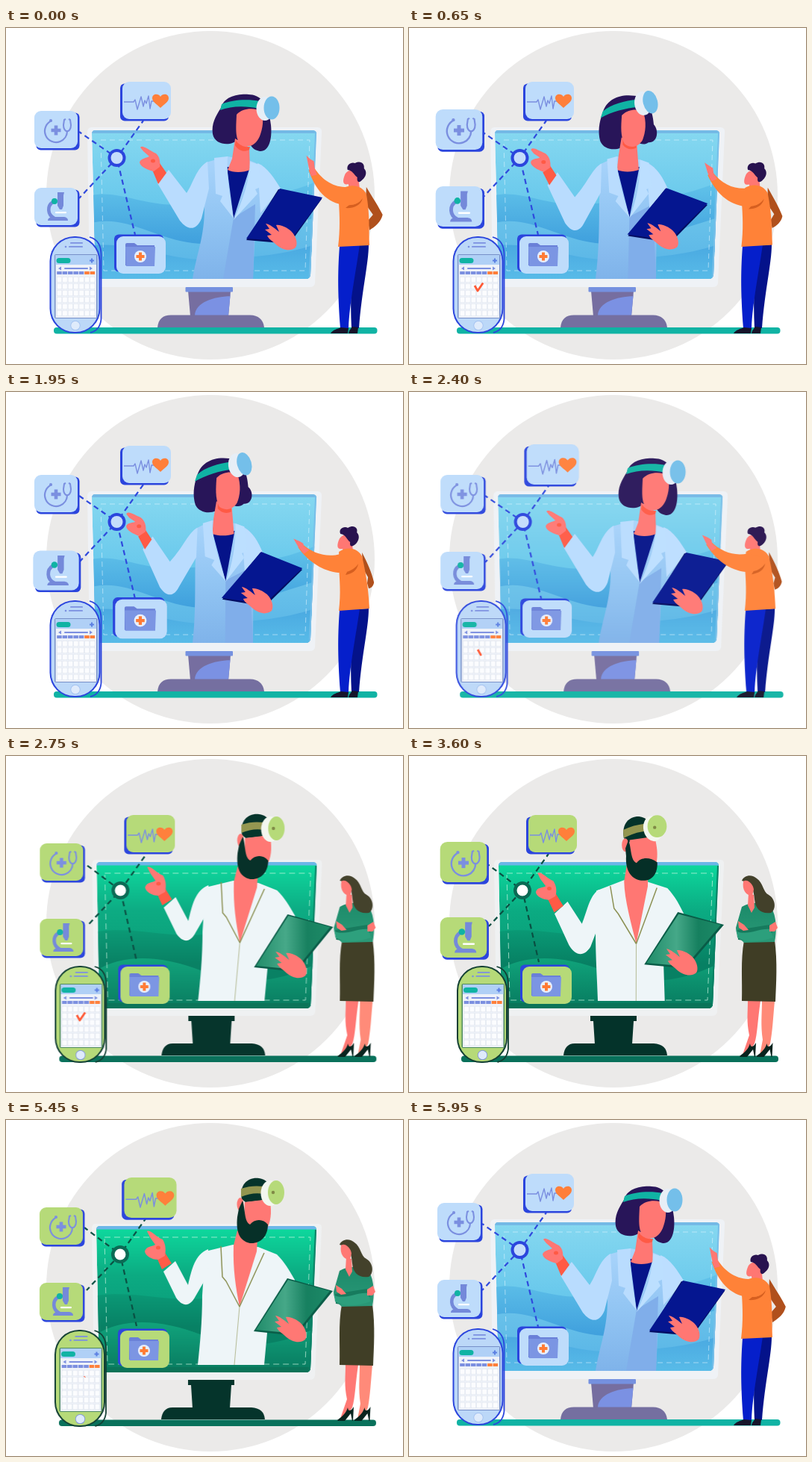
An HTML page with a canvas for the animation above (6 s loop, 532 px wide and 450 px high).

```html
<!DOCTYPE html>
<html lang="en">
<head>
<meta charset="utf-8">
<title>Online consultation</title>
<style>
html, body { margin: 0; width: 100%; height: 100%; overflow: hidden; background: #fff; }
canvas { display: block; width: 532px; height: 450px; }
</style>
</head>
<body>
<canvas id="stage" width="532" height="450"></canvas>
<script>
const W = 532, H = 450, LOOP = 6000;
const view = document.getElementById('stage').getContext('2d');
const layer = document.createElement('canvas');
layer.width = W;
layer.height = H;
const c = layer.getContext('2d');

const SKIN = '#ff7773', DEEP = '#ff5a45', ICON = '#7b8fe0', BLUE = '#2b45dd', ORANGE = '#ff7f3a', TEAL = '#10b3a4';
const NUM = /-?[\d.]+/g;

const clamp = v => Math.max(0, Math.min(1, v));
const ramp = (t, a, b) => clamp((t - a) / (b - a));
const ease = (t, a, b) => { const u = ramp(t, a, b); return u * u * (3 - 2 * u); };
const lerp = (a, b, k) => a + (b - a) * k;
const bump = (t, mid, half) => {
  const u = Math.abs(t - mid) / half;
  return u < 1 ? (1 + Math.cos(Math.PI * u)) / 2 : 0;
};

// Blends two paths that share the same commands.
function mix(a, b, k) {
  const to = b.match(NUM);
  let i = 0;
  return a.replace(NUM, v => lerp(+v, +to[i++], k).toFixed(2));
}
function fill(color, d) {
  c.fillStyle = color;
  c.fill(new Path2D(d));
}
function line(color, width, d) {
  c.strokeStyle = color;
  c.lineWidth = width;
  c.stroke(new Path2D(d));
}
function box(color, x, y, w, h, r = 0) {
  c.fillStyle = color;
  c.beginPath();
  c.roundRect(x, y, w, h, r);
  c.fill();
}
function oval(color, x, y, rx, ry = rx, turn = 0) {
  c.fillStyle = color;
  c.beginPath();
  c.ellipse(x, y, rx, ry, turn, 0, Math.PI * 2);
  c.fill();
}
function fade(y0, y1, ...colors) {
  const g = c.createLinearGradient(0, y0, 0, y1);
  colors.forEach((v, i) => g.addColorStop(i / (colors.length - 1), v));
  return g;
}
function at(x, y, draw) {
  c.save();
  c.translate(x, y);
  draw();
  c.restore();
}
function cross(color, x, y, size, w) {
  box(color, x - size / 2, y - w / 2, size, w);
  box(color, x - w / 2, y - size / 2, w, size);
}

// ---- icon cards ----

function heartIcon() {
  line(ICON, 1.4, 'M158 99H171L173 96L176 109L181 92L184 105L186 97L188 101L191 91L193 108L195 98H198');
  fill(ORANGE, 'M207 107C202 102 196 99 196 94C196 88 204 87 207 92C210 87 218 88 218 94C218 99 212 102 207 107Z');
}
function scopeIcon() {
  c.strokeStyle = ICON;
  c.lineWidth = 2.2;
  c.beginPath();
  c.arc(67, 138, 15, -1.95, 0, true);
  c.stroke();
  oval(ICON, 60, 124, 2);
  line(ICON, 2, 'M80 122L78 123L77 130C77 141 87 141 87 130L86 123L84 122');
  cross(ICON, 67, 137, 13, 4.6);
}
function microIcon() {
  line('#7489da', 4.5, 'M63 233C55 238 55 250 65 255');
  fill('#7489da', 'M56 258C56 254 60 253 64 253H76C81 253 83 255 83 258Z');
  fill('#7489da', 'M69 220H78L77 224V238L75 243H72L69 238V224Z');
  box('#fff', 66, 246, 15, 2.2, 1);
  oval(TEAL, 65, 232, 4);
}
function folderIcon() {
  fill('#6a80d8', 'M160 318V290Q160 288 162 288H172L176 291H199V318Z');
  fill('#7b95e3', 'M160 293H200L199 319H161Z');
  oval('#e8f0ff', 180, 306, 8);
  cross('#ff7b35', 180, 306, 11, 4);
}
// x, y, width, height, shadow shift, icon, shift in the second scene
const CARDS = [
  [156, 72, 65, 50, -3, 2.5, heartIcon, 4, 7],
  [38, 111, 58, 50, 2.5, 2.5, scopeIcon, 6, 6],
  [38, 214, 58, 50, 2.5, 2.5, microIcon, 6, 4],
  [148, 279, 66, 50, -3, -2.5, folderIcon, 4, 3]
];
function cards(t, green) {
  const grow = [
    bump(t, 2900, 400) * 0.08,
    bump(t, 1100, 400) * 0.08,
    bump(t, 1120, 420) * 0.08 + bump(t, 2480, 280) * 0.07,
    bump(t, 2280, 300) * 0.08
  ];
  CARDS.forEach(([x, y, w, h, sx, sy, icon, dx, dy], i) => at(green ? dx : 0, green ? dy : 0, () => {
    const mx = x + w / 2, my = y + h / 2;
    c.translate(mx, my);
    c.scale(1 + grow[i], 1 + grow[i]);
    c.translate(-mx, -my);
    box(BLUE, x + sx, y + sy, w, h, 6);
    box(green ? '#b6da78' : '#bedcfb', x, y, w, h, 9);
    icon();
  }));
}

function links(t, green) {
  const [nx, ny] = green ? [152, 180] : [148.5, 174];
  const ends = green
    ? [[104, 144], [107, 228], [187, 131], [174, 276]]
    : [[98, 139], [98, 228], [184, 124], [173, 277]];
  c.save();
  c.setLineDash([7, 5]);
  c.lineDashOffset = -t * 0.02;
  for (const [x, y] of ends) line(green ? '#0a4f42' : '#2f49dd', 2.2, `M${x} ${y}L${nx} ${ny}`);
  c.restore();
  oval(green ? '#0a6a54' : BLUE, nx, ny, 12);
  oval(green ? '#fff' : '#c4dcfb', nx, ny, green ? 7.5 : 8);
}

// ---- phone ----

function phone(t, green) {
  const edge = green ? '#123f33' : BLUE;
  at(green ? 5.5 : 0, green ? 2 : 0, () => {
    line(edge, 1.8, 'M112 280Q127.5 284 127.5 304V390Q126 405 113 408');
    box(edge, 58.5, 279, 68, 130, 33);
    box(green ? '#b6da78' : '#bcd8f8', 60.5, 281, 64, 126, 31);
    box(ICON, 86, 287, 17, 1.8, 1);
    box(ICON, 84, 292, 19, 1.8, 1);
    oval(ICON, 80, 293, 1.3);
    box(green ? '#4f8a60' : '#7790c8', 65, 303, 57.5, 86, 2);
    box('#eef2f9', 66.5, 304, 54.5, 84);
    box('#b0d0f6', 66.5, 304, 54.5, 13);
    box(TEAL, 67.5, 308, 19, 7, 3.5);
    cross('#5b7fe2', 115, 311.5, 6, 2);
    fill(ICON, 'M70 322L74 319.5V324.5ZM116 322L112 319.5V324.5Z');
    box(ICON, 78, 321, 32, 2, 1);
    for (let x = 0; x < 7; x++) {
      const left = 68.2 + x * 7.4;
      box(x > 4 ? ORANGE : ICON, left, 326, 6.5, 4);
      for (let y = 0; y < 6; y++) {
        box('#dce2ec', left, 333 + y * 9, 6.7, 8, 1);
        box('#fbfcfe', left + 0.4, 333.4 + y * 9, 5.9, 7.2, 1);
      }
    }
    oval(green ? '#7b8fe0' : '#9fbff0', 93, 398.5, 6.6);
    oval('#dfebfb', 93, 398.5, 5.8);
    tick((t + 4000) % 2000);
  });
}
function tick(t) {
  const len = 20.8, head = ramp(t, 250, 600) * len, tail = ease(t, 1180, 1490) * len;
  if (head - tail < 0.2) return;
  c.save();
  c.setLineDash([head - tail, 60]);
  c.lineDashOffset = -tail;
  line('#ff5a36', 2.8, 'M88 345L92 352L99.5 341');
  c.restore();
}

// ---- monitor ----

function monitorBlue() {
  fill('#eff2f6', 'M114 133H418Q424 134 423 140L414 342Q413 347 407 347H118Q113 346 112 340L109 139Q109 134 114 133Z');
  const screen = 'M119 137H412Q417 138 416 143L408 331Q407 336 402 336H125Q120 336 120 331L115 142Q115 137 119 137Z';
  c.save();
  c.clip(new Path2D(screen));
  fill(fade(137, 336, '#86d8f0', '#68c8ec', '#62bce8'), screen);
  fill(fade(205, 290, '#62c4ea', '#3f9fdd'), 'M115 224C150 216 190 241 240 236S350 235 420 204V300H115Z');
  fill(fade(255, 336, '#69c2ea', '#57b3e6'), 'M115 261C160 250 200 282 250 288S360 270 420 252V340H115Z');
  fill(fade(290, 336, '#4aa9e1', '#58bbe8'), 'M115 292C160 284 220 312 270 310S370 306 420 288V340H115Z');
  box('#74b9e6', 110, 137, 310, 4);
  line('#78bfe9', 4, 'M416 140L408 336');
  c.restore();
  c.save();
  c.setLineDash([7, 5]);
  line('rgba(230,246,255,.55)', 1, 'M127 150H407L401 325H131Z');
  c.restore();
  fill('#766ea0', 'M244 352H301L298 386H247Z');
  fill('#7b91e3', 'M301 354L298 385H253C254 367 278 360 301 359Z');
  box('#7591e0', 240.5, 347, 63.5, 6.5, 1);
  fill('#756fa0', 'M203 401C204 390 210 384.5 221 384.5H327Q344 385 346 401Z');
  box(TEAL, 64, 401, 433.5, 8.5, 4);
}
function monitorGreen() {
  fill('#eff1f2', 'M118 139H418Q423 140 422 146L413 343Q412 348 406 348H123Q118 347 117 341L114 145Q114 140 118 139Z');
  const screen = 'M125 142H411Q416 143 415 149L407 333Q406 338 401 338H129Q124 338 124 333L120 147Q120 142 125 142Z';
  c.save();
  c.clip(new Path2D(screen));
  fill(fade(146, 330, '#0dd89d', '#0bab82', '#0a9c78', '#078063'), screen);
  fill(fade(226, 278, '#0a9d78', '#078063'), 'M115 236C170 226 220 246 270 238S360 236 420 214V340H115Z');
  fill(fade(268, 335, '#10a57c', '#087c60'), 'M115 290C150 266 200 264 262 288S370 300 420 276V340H115Z');
  box('#0a7358', 115, 331, 310, 8);
  box('#6bb6e8', 115, 142, 310, 4.5);
  line('#098064', 4, 'M415 147L407 337');
  c.restore();
  c.save();
  c.setLineDash([8, 5]);
  line('rgba(205,245,225,.7)', 1, 'M131 157H407L400 327H135Z');
  c.restore();
  fill('#04332a', 'M243 348H305V355H301L299 386H249L247 355H243ZM207 401C208 391 213 385 222 385H328Q345 386 346 401Z');
  box('#08705a', 70, 401.5, 425, 8.5, 4);
}

function palm(k, from, to, dy) {
  at(lerp(from, to, k), dy * k, () =>
    fill(SKIN, 'M348 262C354 263 361 269 366 273L362 264C368 263 376 267 382 272C390 280 391 290 388 294C381 300 370 297 363 291C358 286 352 283 350 278L356 277L347 270L353 269Z'));
}
// The head dips a little halfway through its swing.
const dip = k => 5.5 * Math.sin(Math.PI * k);

// ---- first scene ----

function doctorBlue(k) {
  const m = (a, b) => mix(a, b, k);
  const hair = m(
    'M288 107C292 92 310 88 325 89C340 89 352 100 355 130C357 150 352 166 340 165C330 163 328 158 325 150L310 150C303 158 280 158 277 142C275 128 281 118 288 107Z',
    'M252 112C257 92 275 84 296 87C312 88 320 105 321 125C330 130 328 147 316 146C312 152 305 150 300 150L285 152C280 162 258 164 251 150C247 138 248 124 252 112Z');
  at(0, dip(k), () => fill('#281559', hair));
  fill(fade(172, 336, '#a9d4fb', '#92c5f3', '#7fb3ea'), m(
    'M268 180L297 172L328 178C345 184 355 195 367 214L345 260L334 270L331 336L250 336C256 300 266 280 266 240Z',
    'M253 183L274 172L306 176C325 182 333 195 341 214L325 262L331 275L331 336L250 336C253 310 252 280 252 240Z'));
  fill('#80aeea', m('M305 254L334 236L331 336L291 336Z', 'M293 252L325 236L331 336L294 336Z'));
  fill('#bcdeff', m('M337 181C350 186 360 202 368 215L341 248Z', 'M313 180C328 186 336 202 341 215L318 248Z'));
  fill('#051389', m('M296 186L327 186L305 255Z', 'M274 186L304 186L293 253Z'));
  fill(SKIN, m('M307 148L303 175L297 190C304 194 318 194 327 190L326 160Z', 'M279 146L275 170L274 190C282 193 294 193 303 190L300 155Z'));
  fill(DEEP, m('M308 151C314 158 320 160 327 159L326 163C319 167 311 164 307 157Z', 'M281 149C286 154 291 157 299 155L299 160C293 163 286 162 281 156Z'));
  fill('#b9dcfe', m('M279 174L297 172C295 200 302 235 305 255L287 232L290 225L281 222Z', 'M262 176L274 172C273 200 288 235 293 253L274 232L278 225L265 220Z'));
  fill('#bcdfff', m('M327 179L339 183L341 213L334 216L337 222L305 257C318 230 326 205 327 179Z', 'M305 176L317 180L321 213L314 216L317 222L293 254C302 230 306 205 305 176Z'));
  fill('#b9dcfe', m(
    'M270 179C255 187 250 210 242 221L218 190L203 208L233 258C245 273 256 270 262 255L272 215Z',
    'M255 182C243 188 238 205 217 228L194 194L181 211L203 262C212 276 222 274 228 262L253 222Z'));
  fill(DEEP, m('M196 190L204 209L215 194L206 181Z', 'M175 194L184 211L193 198L184 184Z'));
  fill(SKIN, m(
    'M180 160C183 156 190 163 201 168C206 172 207 180 206 186L198 192C190 190 180 186 179 180C180 175 188 174 192 172L184 165Z',
    'M159 164C161 159 168 164 178 168C184 172 186 180 185 187L176 193C168 190 159 185 159 180C160 175 166 176 171 174L163 169Z'));
  oval(DEEP, lerp(197, 176, k), lerp(178, 180, k), 3, 2.5);
  at(0, dip(k), () => {
    fill(SKIN, m(
      'M309 116C318 106 335 107 342 112C346 122 344 135 340 145C334 158 325 161 316 156C307 151 308 136 309 116Z',
      'M279 113C287 105 298 104 306 107C312 122 310 138 306 147C300 157 288 157 282 151C277 140 278 126 279 113Z'));
    fill(TEAL, m('M289 102C303 96 324 95 340 98L339 108C322 104 302 104 287 110Z', 'M252 110C263 99 280 94 297 91L299 101C282 104 264 110 249 119Z'));
    oval('#e6eef6', lerp(347, 305, k), lerp(108, 95, k), 11.5, 16, -.15 * k);
    oval('#74bfea', lerp(356, 315, k), lerp(107, 93, k), lerp(10.5, 9.5, k), 15.5, -.3 * k);
  });
  fill('#030d62', m('M365 216L423 229L380 289L322 284Z', 'M338 215L394 239L343 287L286 277Z'));
  fill('#051690', m('M367 215L424 227L380 286L322 282Z', 'M339 214L394 237L342 284L285 275Z'));
  palm(k, 0, -36, -1);
}
function man(k) {
  const m = (a, b) => mix(a, b, k);
  fill('#b0501c', m('M483 213C492 228 500 240 505 250C503 260 494 267 487 271L485 258L492 250L482 236Z', 'M477 215C484 228 490 242 493 255C492 260 490 262 486 263L484 256L485 248L478 236Z'));
  fill('#04128a', 'M465 291L486 290C486 315 477 350 473 402L463 402C461 360 463 330 465 291Z');
  fill('#051fcb', 'M447 292L474 290C470 320 460 370 459 402L448 402C444 350 445 320 447 292Z');
  fill('#16142a', 'M435 409C438 404 444 403 449 401L459 402L458 409ZM459 409C460 404 463 402 464 400L472 401L471 409Z');
  fill(SKIN, m('M455 195C460 188 470 190 472 196L474 214L460 216L459 209C452 211 450 206 455 195Z', 'M447 196C452 189 460 191 463 196L465 214L452 216L451 210C444 212 442 206 447 196Z'));
  fill('#28124f', m(
    'M458 190C456 183 463 179 468 181C476 177 481 182 480 188C485 193 482 200 478 203C474 208 470 207 471 200C466 196 465 191 458 190Z',
    'M448 190C445 183 453 179 458 182C466 177 472 182 470 188C475 193 472 200 469 203C464 208 460 208 461 201C456 197 455 191 448 190Z'));
  fill('#ff8238', m('M453 214C465 208 478 212 483 222C488 250 486 270 487 291L445 293C448 270 447 250 446 234Z', 'M446 214C458 206 471 209 477 220C484 250 486 270 487 290L446 293C449 270 447 250 446 234Z'));
  fill('#d65f20', m('M478 228C476 238 464 242 455 241L460 237C468 237 474 234 478 228Z', 'M472 230C470 240 464 243 455 245L458 239C464 238 469 235 472 230Z'));
  fill('#ff8238', m('M477 221C479 233 468 238 455 237C430 235 414 215 406 190L413 186C425 205 440 213 458 213Z', 'M470 222C472 236 462 242 445 242C425 240 405 228 391 208L397 204C412 217 430 222 448 217Z'));
  fill(SKIN, m('M403 170L408 175L413 178L414 187L417 196L409 198L406 186Z', 'M385 197L393 200L398 203L399 207L406 212L399 217L391 207Z'));
}
function sceneBlue(t) {
  monitorBlue();
  links(t, false);
  cards(t, false);
  phone(t - 450, false);
  doctorBlue(ease(t, 690, 1270) * (1 - ease(t, 2300, 2800)));
  man((1 - Math.cos((t - 250) / 4000 * Math.PI * 2)) / 2);
}

// ---- second scene ----

function headGreen(k) {
  const m = (a, b) => mix(a, b, k);
  fill('#04332a', m('M315 106C311 85 325 76 338 78C352 80 356 92 354 104L340 108L320 110Z', 'M279 106C275 85 288 76 300 77C312 79 318 90 318 104L306 110L285 112Z'));
  fill(SKIN, m('M319 110L352 106C355 118 355 132 350 143C340 148 325 145 318 137Z', 'M288 108L321 103C325 115 327 128 325 140C312 144 296 142 288 134Z'));
  oval(SKIN, lerp(313, 282, k), lerp(113, 116, k), 4.5, 9);
  fill('#052f27', m(
    'M316 108C320 120 318 136 326 140C332 132 344 132 350 140C350 156 340 166 326 165C312 162 307 150 309 130L311 119Z',
    'M287 108C291 122 290 136 298 139C304 131 316 131 327 138C328 154 320 164 306 162C292 160 284 148 285 130L283 120Z'));
  fill('#93964f', m('M314 92C325 88 335 88 345 89L344 99C334 97 324 99 314 103Z', 'M278 96C287 91 296 88 306 86L308 96C297 98 288 102 279 107Z'));
  oval('#f3f7ef', lerp(353, 318, k), lerp(98, 92, k), 12.5, 17, -.3 * k);
  oval('#b6da78', lerp(361, 323, k), lerp(97, 88, k), lerp(11, 13.5, k), lerp(16, 14.5, k));
  oval('#7f8a45', lerp(357, 320, k), lerp(97, 90, k), 2.2);
}
function doctorGreen(k) {
  const m = (a, b) => mix(a, b, k);
  fill('#eef5f8', m(
    'M266 176L303 167L337 170L362 180C372 190 378 200 386 214L370 260L350 275L345 328L256 328C259 300 262 270 262 235Z',
    'M246 182L283 166L314 168L341 176C352 188 358 200 364 214L352 260L338 275L342 328L252 328C250 300 246 270 246 235Z'));
  fill(SKIN, m('M309 148L304 168C303 200 307 225 312 250L335 176L336 160Z', 'M286 146L283 168C284 190 295 225 302 252L315 174L315 156Z'));
  line('#8c9154', 1.5, m('M287 169L289 210L294 216L312 250L345 178', 'M264 176L270 202L276 210L302 252L328 176'));
  line('#b5bb95', 1, m('M312 250L305 328', 'M302 252L304 328'));
  fill('#eef5f8', m(
    'M270 173C252 180 248 200 243 221L226 189L210 203L227 238C236 251 246 250 253 236L271 205Z',
    'M249 181C238 190 236 210 228 226L208 197L190 214L210 258C220 276 232 274 240 262L254 220Z'));
  at(0, dip(k) * .5, () => {
    fill(DEEP, m('M200 182L208 200L221 192L211 176Z', 'M180 189L190 210L202 201L191 183Z'));
    fill(SKIN, m(
      'M188 149C193 146 200 157 209 160C214 168 213 176 212 182L203 187C194 187 186 182 185 176C187 169 194 170 199 167L192 157Z',
      'M167 157C171 153 179 163 188 167C193 174 193 182 191 187L182 192C174 191 166 188 165 182C166 175 173 177 178 174L171 165Z'));
    oval(DEEP, lerp(203, 183, k), lerp(171, 177, k), 3, 2.5);
  });
  at(0, dip(k), () => headGreen(k));
  const shift = lerp(0, -20, k);
  const g = c.createLinearGradient(332 + shift, 0, 436 + shift, 0);
  [['#1f8b68', 0], ['#45a888', .4], ['#16805f', .68], ['#1d8a67', 1]].forEach(([v, p]) => g.addColorStop(p, v));
  fill('#095c47', m('M376 212L437 229L388 289L331 283Z', 'M355 208L417 225L366 283L310 278Z'));
  fill(g, m('M377 214L433 229L387 286L334 281Z', 'M356 211L413 225L365 280L313 276Z'));
  palm(k, 12, -8, -5);
}
function woman(k) {
  const m = (a, b) => mix(a, b, k);
  fill('#ff8a78', 'M473 328H490C488 350 487 370 484 385L477 400L470 401L474 380C471 360 473 345 473 328Z');
  fill(SKIN, 'M454 328H471C467 355 467 372 463 385L455 398L447 400L456 374C452 355 454 345 454 328Z');
  for (const x of [0, 22.5]) at(x, 0, () => fill('#07231d', 'M443 402C450 397 455 392 457 385C458 392 462 389 465 384L464 403H463L461 393L453 403H444Z'));
  fill('#3f3d25', 'M449 247H490C494 275 492 305 491 329L446 328C447 300 444 275 449 247Z');
  fill(fade(195, 252, '#1b8a69', '#2a9977'), m(
    'M446 202C457 195 475 195 485 202C493 215 493 235 490 249L449 250C446 247 438 242 438 230Z',
    'M451 201C464 194 480 195 490 203C497 215 494 235 491 249L450 250C446 247 442 240 443 228Z'));
  fill(SKIN, m('M455 184L454 200L459 210L463 203L462 186Z', 'M467 182L465 199L468 209L475 202L475 184Z'));
  fill('#42402a', m(
    'M446 167C449 159 460 158 466 164C475 170 474 182 482 186C492 192 492 206 485 210C472 212 464 205 463 192C462 180 460 170 446 167Z',
    'M460 165C462 156 474 155 480 160C488 168 486 180 492 188C498 198 496 213 488 215C474 214 468 206 472 194C476 180 474 170 460 165Z'));
  fill(SKIN, m('M448 168C453 164 461 171 462 179L460 187C452 187 446 180 448 168Z', 'M463 166C467 161 476 168 476 176L474 183C467 183 461 178 463 166Z'));
  fill('#167a5d', m('M440 233L483 226L487 236C472 246 452 248 441 246Z', 'M445 233L487 229L491 238C476 247 456 248 445 246Z'));
  fill('#2c9f7c', m('M439 235C455 241 470 230 484 232L488 243C470 250 450 250 440 243Z', 'M444 234C459 240 474 230 488 233L491 244C474 250 454 250 445 244Z'));
  fill(SKIN, m('M441 221L449 226L455 233L448 234L442 230ZM483 227L491 222L494 230L490 235L483 235Z', 'M447 219L455 225L460 232L454 233L447 228ZM487 229L495 225L498 232L494 236L487 236Z'));
}
function sceneGreen(t) {
  monitorGreen();
  links(t, true);
  cards(t, true);
  phone(t + 2520, true);
  doctorGreen(ease(t, 690, 1270) * (1 - ease(t, 2300, 2880)));
  woman(ease(t, 1100, 1750) * (1 - ease(t, 2330, 2880)));
}

// ---- timeline ----

function show(scene, t, inEnd, outStart) {
  const enter = 1 - ramp(t, 0, inEnd), leave = ramp(t, outStart, outStart + 250);
  const alpha = (1 - enter) * (1 - leave);
  if (alpha <= 0) return;
  c.clearRect(0, 0, W, H);
  scene(t);
  view.globalAlpha = 1 - (1 - alpha) ** 3;
  view.drawImage(layer, 110 * (enter ** 3 + leave ** 3), 0);
  view.globalAlpha = 1;
}
function frame(now) {
  const t = now % LOOP;
  view.fillStyle = '#fff';
  view.fillRect(0, 0, W, H);
  view.fillStyle = '#ebeae9';
  view.beginPath();
  view.arc(274, 224, 220, 0, Math.PI * 2);
  view.fill();
  const a = (t + 450) % LOOP, b = t - 2520;
  if (a < 3100) show(sceneBlue, a, 300, 2767);
  if (b >= 0 && b < 3200) show(sceneGreen, b, 300, 2880);
}
const start = performance.now();
function loop() {
  frame(performance.now() - start);
  requestAnimationFrame(loop);
}
c.lineJoin = 'round';
loop();
</script>
</body>
</html>
```
